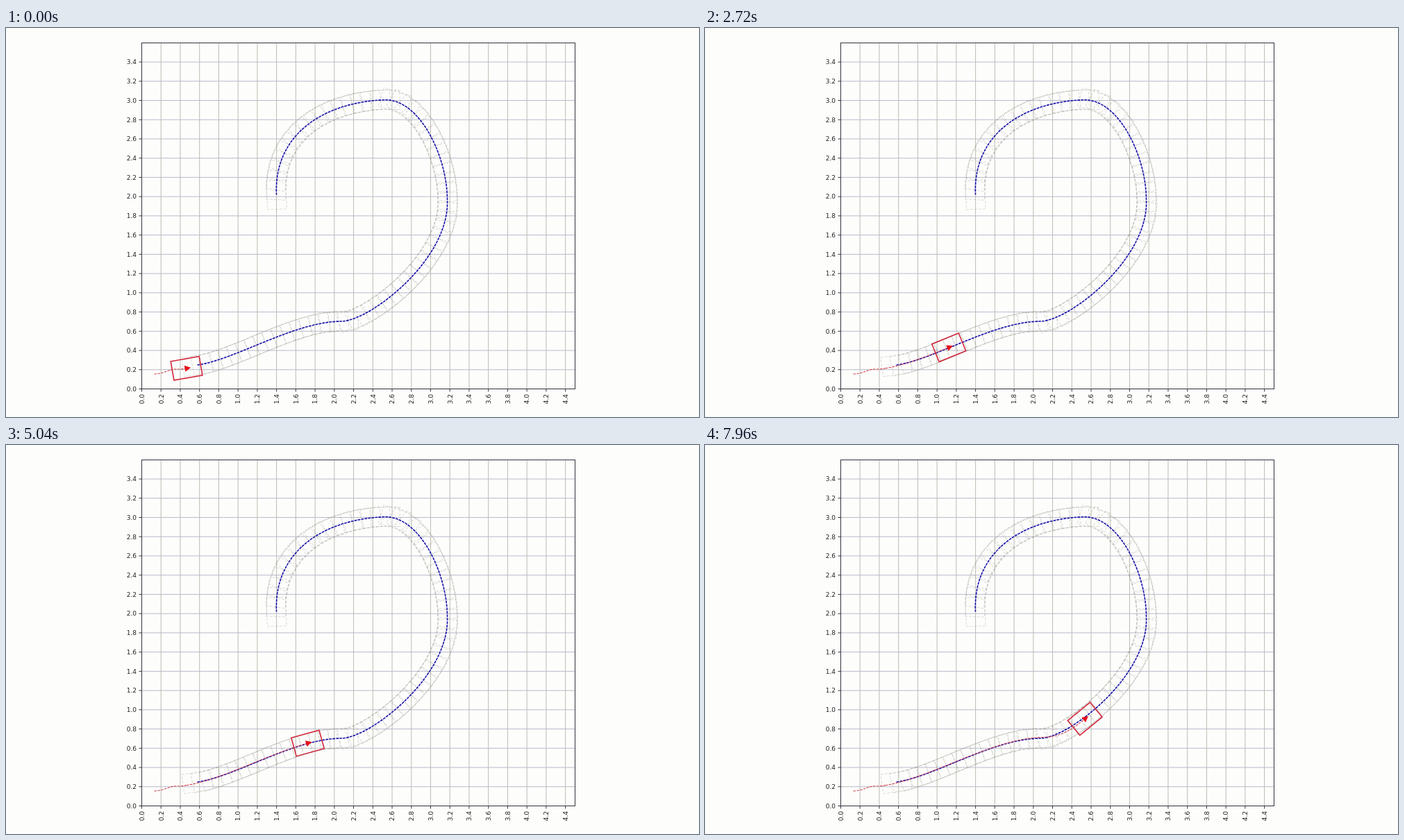
Animation of 998 by 561 pixels, one loop 8 s. Source, as an HTML page:

```html
<!DOCTYPE html>
<html lang="en">
<head>
<meta charset="utf-8">
<title>Path following</title>
<style>
  html, body { margin: 0; width: 100%; height: 100%; overflow: hidden; background: #fdfdfc; }
  svg { display: block; width: 100vw; height: 100vh; }
  text { font: 9px "DejaVu Sans", sans-serif; fill: #222; text-anchor: end; }
  path, line, rect { fill: none; }
  .row { stroke: #b9b9c9; }
  .col { stroke: #bcbcb0; }
  .tick, .frame { stroke: #33333d; }
  .ghost { stroke: #77776c; stroke-opacity: .25; stroke-dasharray: 4 2; }
  .route { stroke: #1610a8; stroke-width: 1.6; stroke-dasharray: 3.8 1.2; }
  .trail { stroke: #d2454f; stroke-width: 1.1; stroke-dasharray: 3.4 1.5; }
  .body { stroke: #d3283c; stroke-width: 1.6; }
  .head { fill: #e8101c; }

  /* The vehicle and its trail share one slightly accelerating clock. */
  #car, .reveal { animation: 8s cubic-bezier(.333, .293, .667, .627) infinite; }
  #car {
    offset-path: path("M259.5 490.3C330 478 410 424 484 421C514 421 530 408 548 393.3");
    offset-rotate: auto;
    animation-name: drive;
  }
  .reveal {
    stroke: #fff; stroke-width: 20; stroke-dasharray: 1 2;
    animation-name: reveal;
  }
  @keyframes drive { from { offset-distance: 0%; } to { offset-distance: 100%; } }
  @keyframes reveal { from { stroke-dashoffset: 1; } to { stroke-dashoffset: 0; } }
</style>
</head>
<body>
<svg viewBox="0 0 998 561">
  <defs>
    <path id="driven" d="M259.5 490.3C330 478 410 424 484 421C514 421 530 408 548 393.3"/>
    <mask id="passed" maskUnits="userSpaceOnUse" x="0" y="0" width="998" height="561">
      <path class="reveal" pathLength="1" d="M259.5 490.3C330 478 410 424 484 421C514 421 530 408 548 393.3"/>
    </mask>
  </defs>
  <g id="grid"></g>
  <rect class="frame" x="195.5" y="21.5" width="624" height="499"/>
  <g transform="translate(.5 .5)">
    <g id="ghosts"></g>
    <path id="route" class="route" d="M275 485.5C330 478 416 422 484 422.5C526 420 639 332 635 247C635 185 595 100 543 103.2C458 107 385 152 389 240"/>
    <path class="trail" d="M213 498.5C228 498 234 491.5 244 491.5S254 491.2 259.5 490.3"/>
    <use class="trail" href="#driven" mask="url(#passed)"/>
    <g id="car">
      <rect class="body" x="-20.8" y="-13.8" width="41.6" height="27.6"/>
      <path class="head" d="M-2.5-4.5 6.2 0-2.5 4.5Z"/>
    </g>
  </g>
</svg>
<script>
const LEFT = 195.5, TOP = 21.5, RIGHT = 819.5, BOTTOM = 520.5;
const CELL = (RIGHT - LEFT) / 22.5, SPACING = 13.9;
const grid = document.getElementById("grid");
const ghosts = document.getElementById("ghosts");
const route = document.getElementById("route");

function add(parent, tag, attrs, text = "") {
  const el = document.createElementNS("http://www.w3.org/2000/svg", tag);
  for (const key in attrs) el.setAttribute(key, attrs[key]);
  el.textContent = text;
  parent.append(el);
}

function addLine(kind, x1, y1, x2, y2) {
  add(grid, "line", { class: kind, x1, y1, x2, y2 });
}

for (let i = 0; i <= 22; i++) {
  const x = LEFT + i * CELL, label = (i / 5).toFixed(1);
  addLine("col", x, TOP, x, BOTTOM);
  addLine("tick", x, BOTTOM, x, BOTTOM + 4);
  add(grid, "text", { transform: `translate(${x + 3.3} 528)rotate(-90)` }, label);
}

for (let i = 0; i < 18; i++) {
  const y = BOTTOM - i * CELL, label = (i / 5).toFixed(1);
  addLine("row", LEFT, y, RIGHT, y);
  addLine("tick", LEFT - 4, y, LEFT, y);
  add(grid, "text", { x: 188, y: y + 3.3 }, label);
}

// Faint vehicle outlines along the planned route
const total = route.getTotalLength(), count = Math.round(total / SPACING);
for (let i = 0; i <= count; i++) {
  const s = total * i / count;
  const p = route.getPointAtLength(s);
  const a = route.getPointAtLength(s - 2), b = route.getPointAtLength(s + 2);
  const turn = Math.atan2(b.y - a.y, b.x - a.x) * 180 / Math.PI;
  add(ghosts, "rect", {
    class: "ghost", x: -20.8, y: -13.9, width: 41.6, height: 27.8,
    transform: `translate(${p.x} ${p.y})rotate(${turn})`
  });
}
</script>
</body>
</html>
```
